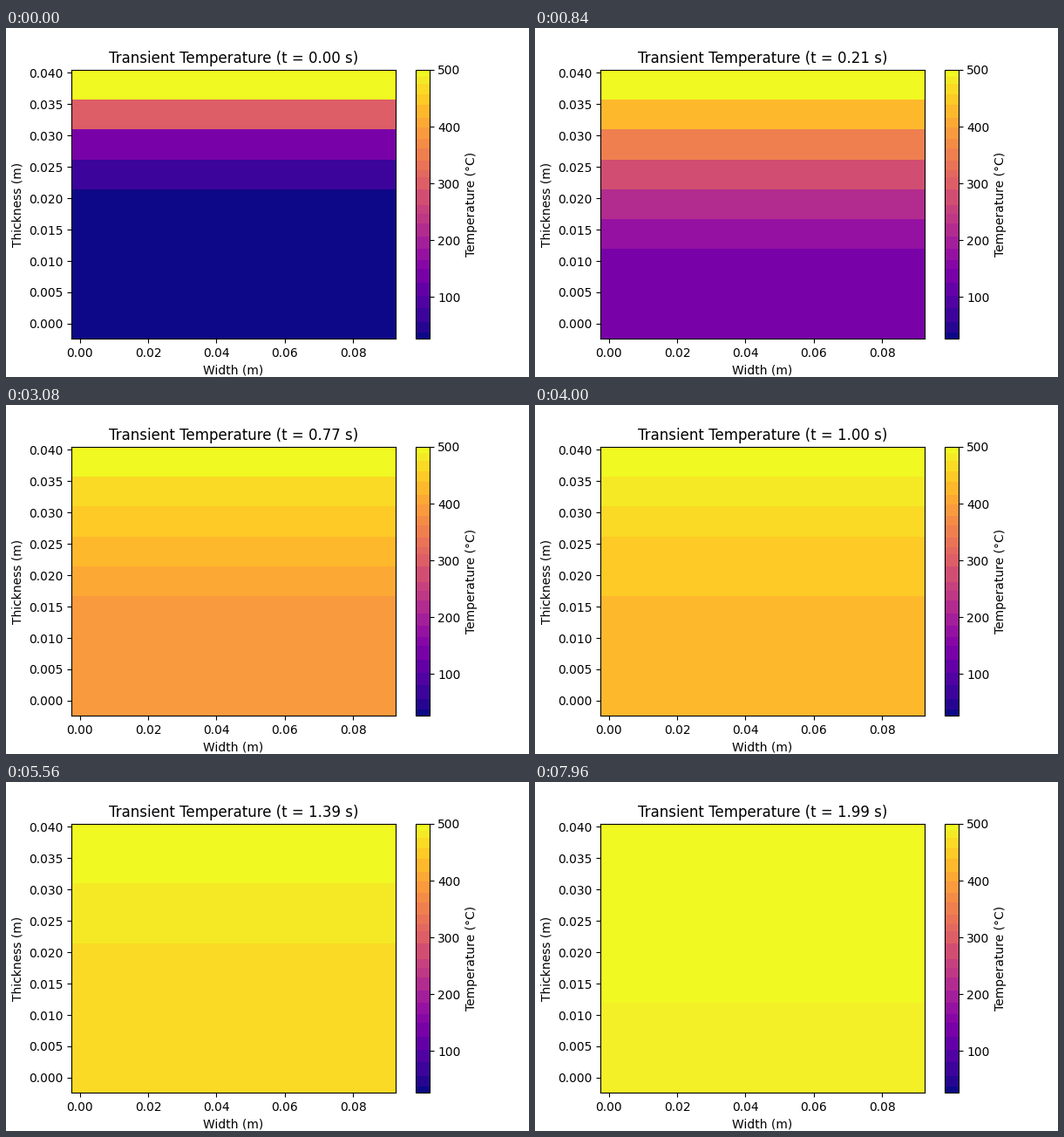
A matplotlib script that plays this animation: 600x400 px, repeating every 8 s.

```python
import numpy as np
import matplotlib.pyplot as plt
from matplotlib.animation import FuncAnimation
from matplotlib.colors import ListedColormap

FRAMES, INTERVAL = 200, 40
DT = 0.01                       # simulated seconds per frame
COLD, HOT = 27, 500
NX, NY = 19, 9
DX, DY = 0.005, 0.0381 / 8
FOURIER = 0.45                  # alpha * dt / dy^2
WARMUP = 3                      # steps already taken at t = 0

# Temperatures at which the colour steps
EDGES = [COLD, 38, 56, 80, 103, 126, 150, 165, 185, 207, 230, 246, 262, 290,
         311, 323, 341, 362, 378, 398, 416, 438, 457, 476, 488, 490, HOT]


def banded_cmap():
    edges = np.array(EDGES)
    shades = (edges[:-1] + edges[1:]) / 2
    shades[[0, -1]] = COLD, HOT
    per_degree = np.repeat(shades, np.diff(edges))
    plasma = plt.get_cmap("plasma")
    return ListedColormap(plasma((per_degree - COLD) / (HOT - COLD)))


def simulate():
    """Explicit heat conduction: hot top edge, insulated bottom edge."""
    temp = np.full(NY, float(COLD))
    temp[-1] = HOT
    history = []
    for _ in range(FRAMES + WARMUP):
        history.append(temp.copy())
        temp[1:-1] += FOURIER * (temp[2:] - 2 * temp[1:-1] + temp[:-2])
        temp[0] = temp[1]
    return history[WARMUP:]


profiles = simulate()

fig, ax = plt.subplots(figsize=(6, 4), dpi=100)
x_edges = np.array([-0.5, NX - 0.5]) * DX
y_edges = (np.arange(NY + 1) - 0.5) * DY
mesh = ax.pcolormesh(x_edges, y_edges, profiles[0][:, None],
                     cmap=banded_cmap(), vmin=COLD, vmax=HOT)
fig.colorbar(mesh, ax=ax, label="Temperature (°C)")
ax.set_xlabel("Width (m)")
ax.set_ylabel("Thickness (m)")
title = ax.set_title("")


def update(i):
    mesh.set_array(profiles[i][:, None])
    title.set_text(f"Transient Temperature (t = {i * DT:.2f} s)")
    return mesh, title


anim = FuncAnimation(fig, update, frames=FRAMES, interval=INTERVAL,
                     repeat=True, repeat_delay=0)
plt.show()
```
